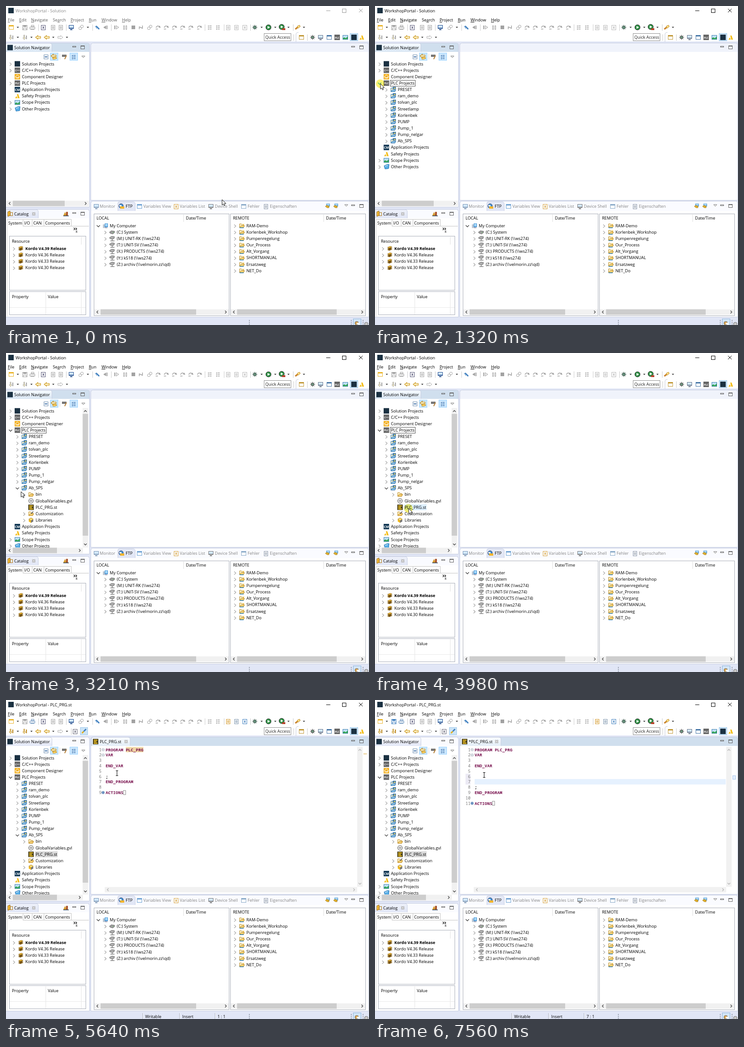
Recreate the animation shown at these times as an HTML page with a canvas. Size 798 by 702 pixels, loop 8000 ms.

```html
<!DOCTYPE html>
<html lang="en">
<head>
<meta charset="utf-8">
<title>Workshop</title>
<style>
html, body { margin: 0; width: 100%; height: 100%; overflow: hidden; background: #fff; }
canvas { display: block; width: 798px; height: 702px; }
</style>
</head>
<body>
<canvas id="stage" width="798" height="702"></canvas>
<script>
const g = document.getElementById('stage').getContext('2d');
const LOOP = 8000, ROW = 14.15, LINE = 11.8;
const SANS = '"Open Sans", "Noto Sans", sans-serif', MONO = '"Noto Sans Mono", "DejaVu Sans Mono", monospace';
const LAV = '#e1e6f6', EDGE = '#c6cde0', PALE = '#f0f3fb', GREY = '#a2a2a2', GOLD = '#eab52c', BLUE = '#3f7fbf', NAVY = '#1b3142', WINE = '#7a1450';

// ---- drawing helpers ----
function rect(x, y, w, h, col) { g.fillStyle = col; g.fillRect(x, y, w, h); }
function frame(x, y, w, h, col) { g.strokeStyle = col; g.lineWidth = 1; g.strokeRect(x + .5, y + .5, w - 1, h - 1); }
function poly(pts, fill, stroke, w = 1, close = true) {
  g.beginPath();
  for (let i = 0; i < pts.length; i += 2) g.lineTo(pts[i], pts[i + 1]);
  if (close) g.closePath();
  if (fill) { g.fillStyle = fill; g.fill(); }
  if (stroke) { g.strokeStyle = stroke; g.lineWidth = w; g.stroke(); }
}
const line = (col, w, ...pts) => poly(pts, null, col, w, false);
function disc(x, y, r, fill, stroke, w = 1) {
  g.beginPath(); g.arc(x, y, r, 0, 7);
  if (fill) { g.fillStyle = fill; g.fill(); }
  if (stroke) { g.strokeStyle = stroke; g.lineWidth = w; g.stroke(); }
}
function text(s, x, y, col = '#000', font = '9.1px ' + SANS, align = 'left') {
  g.font = font; g.fillStyle = col; g.textAlign = align;
  g.fillText(s, x, y + 3.2);
}
function tabShape(x, y, w, h, top, bottom) {
  const grad = g.createLinearGradient(0, y, 0, y + h);
  grad.addColorStop(0, top); grad.addColorStop(1, bottom);
  g.beginPath();
  g.moveTo(x, y + h); g.lineTo(x, y + 3); g.quadraticCurveTo(x, y, x + 3, y);
  g.lineTo(x + w - 5, y); g.quadraticCurveTo(x + w, y, x + w, y + 5); g.lineTo(x + w, y + h);
  g.fillStyle = grad; g.fill();
  g.strokeStyle = EDGE; g.lineWidth = 1; g.stroke();
}
function panel(x, y, w, h, strip, col) {
  g.beginPath(); g.roundRect(x + .5, y + .5, w - 1, h - 1, [5, 5, 0, 0]);
  g.fillStyle = '#fff'; g.fill();
  g.save(); g.clip(); rect(x, y, w, strip, col); g.restore();
  g.beginPath(); g.roundRect(x + .5, y + .5, w - 1, h - 1, [5, 5, 0, 0]);
  g.strokeStyle = EDGE; g.lineWidth = 1; g.stroke();
}
function chevron(x, y, open, hot) {
  const col = hot ? '#35bdeb' : open ? '#333' : '#9a9a9a';
  if (open) line(col, 1.2, x - 3.5, y - 1.8, x, y + 1.8, x + 3.5, y - 1.8);
  else line(col, 1.1, x - 1.8, y - 3.5, x + 1.8, y, x - 1.8, y + 3.5);
}
function arrowTip(x, y, dx, dy, col = '#444') {
  line(col, 1.3, x - 1.5 * dx - 3 * dy, y - 1.5 * dy - 3 * dx, x + 1.5 * dx, y + 1.5 * dy, x - 1.5 * dx + 3 * dy, y - 1.5 * dy + 3 * dx);
}
function hScroll(x0, x1, y, a, b) {
  rect(x0, y - 6, x1 - x0, 12, '#f1f1f1');
  if (b) rect(a, y - 6, b - a, 12, '#cdcdcd');
  const col = b ? '#444' : '#b5b5b5';
  arrowTip(x0 + 7, y, -1, 0, col); arrowTip(x1 - 7, y, 1, 0, col);
}
function vScroll(x, y0, y1, a, b) {
  rect(x - 6, y0, 12, y1 - y0, '#f1f1f1');
  if (b) rect(x - 6, a, 12, b - a, '#cdcdcd');
  const col = b ? '#444' : '#b5b5b5';
  arrowTip(x, y0 + 7, 0, -1, col); arrowTip(x, y1 - 7, 0, 1, col);
}
function minMax(x, y) {
  frame(x - 4, y - 2, 8, 3, '#666');
  frame(x + 14, y - 3, 9, 8, '#666'); rect(x + 14, y - 3, 9, 2, '#666');
}
function cross(x, y) {
  line('#777', 2.6, x - 3, y - 3, x + 3, y + 3); line('#777', 2.6, x + 3, y - 3, x - 3, y + 3);
  line('#fff', 1.1, x - 3, y - 3, x + 3, y + 3); line('#fff', 1.1, x + 3, y - 3, x - 3, y + 3);
}
function tile(x, y, s, col) {
  rect(x - 6, y - 6, 12, 12, col);
  if (s) text(s, x, y - .6, '#fff', 'bold ' + (s.length > 2 ? 5.6 : 7) + 'px ' + SANS, 'center');
}
function folder(x, y, col, edge) {
  poly([x - 5, y + 4, x - 5, y - 4, x - 1, y - 4, x, y - 2, x + 4, y - 2, x + 4, y + 4], '#fff6cf', edge);
  poly([x - 5, y + 4, x - 2, y, x + 6, y, x + 3.5, y + 4], col, edge);
}

// ---- icons, all centred on x, y ----
const icons = {
  brand: (x, y) => tile(x, y, '', NAVY),
  cpp: (x, y) => tile(x, y, 'C++', '#666'),
  plc: (x, y) => tile(x, y, 'PLC', '#666'),
  cm: (x, y) => tile(x, y, 'CM', '#143a56'),
  part: (x, y) => { tile(x, y, '', '#f2ae1d'); poly([x - 5, y, x, y - 4, x + 5, y, x, y + 2], null, '#fff'); text('CMP', x, y + 1.6, '#fff', 'bold 4px ' + SANS, 'center'); },
  safety: (x, y) => { poly([x - 1, y - 4, x + 2, y - 4, x + 5, y + 5, x + 1, y + 5], '#f3bd19'); poly([x - 5, y + 5, x - 2, y, x, y + 5], '#f3bd19'); },
  scope: (x, y) => { rect(x - 6, y - 5, 12, 10, '#bfe0f5'); poly([x - 6, y + 5, x - 6, y + 2, x - 2, y, x + 1, y + 2, x + 6, y - 3, x + 6, y + 5], '#35a853'); frame(x - 6, y - 5, 12, 10, '#4b86b5'); },
  other: (x, y) => { poly([x - 5, y - 2, x + 2, y - 5, x + 6, y - 5, x + 5, y + 4, x - 3, y + 5], '#58aee6', '#2575b8'); line('#fff', 1, x - 3, y - 1, x + 3, y - 3); },
  proj: (x, y) => { folder(x, y + .5, '#8cc4ea', '#2b6ea8'); rect(x - 1, y - 6, 7, 5, '#2f6ea5'); rect(x + 1, y - 4, 4, 2, '#f5d562'); },
  bin: (x, y) => folder(x, y, '#fbd77c', '#b98418'),
  remote: (x, y) => { folder(x, y, '#fbd97a', '#b98b2a'); line('#2f7fb5', 1.6, x - 5, y + 4.5, x + 4, y + 4.5); poly([x + 1, y - 6, x + 3, y - 3, x + 6, y - 4, x + 3, y - 1], '#f2b414'); },
  setup: (x, y) => { folder(x, y, '#fbd77c', '#b98418'); line('#555', 1.6, x, y, x + 5, y - 5); },
  globe: (x, y) => { disc(x, y, 5.3, '#f5f5f5', '#666'); line('#777', .8, x - 5, y, x + 5, y); line('#777', .8, x - 3, y - 4, x + 3, y + 4); line('#777', .8, x + 3, y - 4, x - 3, y + 4); },
  st: (x, y) => { tile(x, y, '', '#4a4220'); [-4, -.7, 2.6].forEach((d, i) => rect(x - 4, y + d, i == 1 ? 6 : 8, 2, '#f6c51e')); },
  lib: (x, y) => { poly([x - 5, y - 2, x, y - 5, x + 5, y - 2, x, y + 1], '#ffe27a', '#a87a12'); poly([x - 5, y - 1, x, y + 1, x, y + 6, x - 5, y + 3], '#f0b81c'); poly([x + 5, y - 1, x, y + 1, x, y + 6, x + 5, y + 3], '#777'); },
  stack: (x, y) => { for (let i = 2; i >= 0; i--) poly([x - 5, y - 2.5 + i * 2.6, x + 1, y - 5 + i * 2.6, x + 5, y - 3.5 + i * 2.6, x - 1, y - 1 + i * 2.6], i ? '#6a4a10' : '#f2bb33', '#8b6314', .8); },
  pc: (x, y) => { rect(x - 5, y - 3, 6, 8, '#b9c6d4'); rect(x - 1, y - 5, 7, 8, '#3d8ed0'); rect(x, y - 4, 5, 5, '#a9dcff'); rect(x, y + 4, 5, 1, '#557'); },
  disk: (x, y) => { poly([x - 6, y, x - 2, y - 3, x + 5, y - 2, x + 5, y + 1, x + 1, y + 4, x - 5, y + 2], '#a0a0a0', '#666'); rect(x + 1, y, 2, 1, '#5c5'); },
  net: (x, y) => { poly([x - 6, y - 2, x - 1, y - 5, x + 5, y - 4, x + 4, y, x, y + 1, x - 5, y], '#b0b0b0', '#666'); line('#777', 1.4, x, y + 1, x, y + 5); line('#777', 1.4, x - 4, y + 5, x + 5, y + 5); },
  win: (x, y, c) => { rect(x - 5, y - 4, 10, 9, '#fff'); frame(x - 5, y - 5, 11, 10, c); rect(x - 5, y - 5, 11, 3, c); },
  save: (x, y, c) => { frame(x - 5, y - 5, 11, 11, c); rect(x - 3, y - 5, 7, 4, c); frame(x - 3, y + 1, 7, 5, c); },
  print: (x, y, c) => { frame(x - 3, y - 5, 7, 4, c); frame(x - 6, y - 1, 12, 5, c); rect(x - 4, y + 3, 8, 2, c); },
  doc: (x, y, c) => { frame(x - 4, y - 5, 9, 11, c); [-2, 0, 2].forEach(d => rect(x - 2, y + d, 5, 1, c)); },
  form: (x, y, c) => { frame(x - 5, y - 5, 10, 11, c); text('x', x, y - .5, c, 'bold 8px ' + SANS, 'center'); },
  list: (x, y, c) => [-4, -.5, 3].forEach(d => { rect(x - 4, y + d, 2, 2, c); rect(x - 1, y + d, 5, 1.3, c); }),
  mon: (x, y, c) => { rect(x - 5, y - 5, 11, 8, c); rect(x - 4, y - 4, 9, 5, '#d4eaff'); rect(x - 2, y + 4, 5, 2, c); },
  link: (x, y, c) => { disc(x - 2, y + 2, 3, null, c); disc(x + 2, y - 2, 3, null, c); },
  pen: (x, y, c) => { line(c, 2.6, x - 3, y - 3, x + 4, y + 4); line(c, 1, x - 5, y - 3, x - 1, y + 3); },
  play: (x, y, c) => { rect(x - 5, y - 4, 2, 8, c); poly([x - 1, y - 4, x + 5, y, x - 1, y + 4], '#eee', c); },
  back: (x, y, c) => { poly([x + 1, y - 4, x - 5, y, x + 1, y + 4], c); rect(x + 2, y - 4, 2, 8, c); },
  pause: (x, y, c) => { frame(x - 4, y - 4, 3, 9, c); frame(x + 1, y - 4, 3, 9, c); },
  stop: (x, y, c) => rect(x - 4, y - 4, 8, 8, c),
  zig: (x, y, c) => line(c, 1.5, x - 4, y + 4, x - 4, y - 1, x + 3, y + 2, x + 3, y - 4),
  step: (x, y, c) => { g.beginPath(); g.arc(x, y + 1, 4, 3.2, 5.9); g.strokeStyle = c; g.lineWidth = 1.6; g.stroke(); poly([x + 1, y, x + 6, y + 1, x + 4, y - 4], c); rect(x - 5, y + 3, 5, 1.4, c); },
  left: (x, y, c) => poly([x - 6, y, x - 1, y - 4, x - 1, y - 2, x + 5, y - 2, x + 5, y + 2, x - 1, y + 2, x - 1, y + 4], '#fff3c4', c, 1.2),
  right: (x, y, c) => poly([x + 6, y, x + 1, y - 4, x + 1, y - 2, x - 5, y - 2, x - 5, y + 2, x + 1, y + 2, x + 1, y + 4], '#fff', c),
  down: (x, y, c) => { poly([x - 1, y + 5, x - 4, y + 1, x - 2, y + 1, x - 2, y - 5, x, y - 5, x, y + 1, x + 2, y + 1], '#fff3c4', c); rect(x + 3, y - 4, 2, 8, c); },
  bug: (x, y, c) => { for (let a = 0; a < 4; a++) { const p = Math.cos(a * .785) * 5.5, q = Math.sin(a * .785) * 5.5; line(c, 1, x - p, y - q, x + p, y + q); } disc(x, y, 3, '#6f9a83', c); },
  run: (x, y, c) => { disc(x, y, 5.8, c, '#333'); poly([x - 2, y - 3, x + 3.5, y, x - 2, y + 3], '#fff'); },
  runTool: (x, y) => { icons.run(x - 1, y - 1, '#2f9145'); rect(x, y + 2, 7, 4, '#b8442c'); },
  torch: (x, y) => { line('#c9822a', 3.4, x - 5, y + 4, x, y); poly([x - 1, y - 2, x + 4, y - 5, x + 6, y - 2, x + 1, y + 2], '#ffe08a', '#b98418'); },
  swap: (x, y) => { icons.left(x - 1, y - 2, '#b98418'); poly([x + 6, y + 3, x + 1, y - 1, x + 1, y + 1, x - 3, y + 1, x - 3, y + 5, x + 1, y + 5], '#ffd867', '#b98418'); },
  hammer: (x, y) => { rect(x - 6, y - 5, 10, 5, '#777'); line('#b5803a', 2, x + 4, y - 3, x, y + 5); },
  collapse: (x, y) => { frame(x - 5, y - 5, 10, 10, '#6f8fb0'); rect(x - 3, y - 1, 6, 2, '#3f70a8'); },
  ftp: (x, y) => { disc(x - 1, y - 1, 5, '#3d8ed0', '#557'); rect(x - 3, y, 9, 5, '#f1b52f'); rect(x - 5, y - 3, 5, 3, '#eee'); },
  plug: (x, y) => { rect(x - 3, y - 5, 8, 6, '#4a9bd8'); rect(x - 2, y - 4, 6, 3, '#b5dcf7'); poly([x - 5, y + 1, x - 1, y - 2, x - 1, y, x + 3, y, x + 3, y + 4, x - 1, y + 4], GOLD, '#9a7416', .8); },
  dd: (x, y) => poly([x - 2.5, y - 1.2, x + 2.5, y - 1.2, x, y + 1.6], '#333'),
  tri: (x, y) => poly([x - 3.5, y - 2, x + 3.5, y - 2, x, y + 1.8], '#fff', '#777'),
  sep: (x, y) => { for (let d = -6; d < 7; d += 2) rect(x, y + d, 1, 1, '#999'); }
};
function put(y, spec, col) {
  for (const item of spec.split(' ')) {
    const [name, x, c] = item.split(':');
    icons[name](+x, y, c || col);
  }
}

// ---- tree rows ----
let mouse = { x: 0, y: 0 };
function row(x, y, chev, icon, label, font) {
  if (chev) {
    const hot = Math.hypot(mouse.x - x + 25, mouse.y - y) < 6;
    chevron(x - 25, y + .8, chev == 'v', hot);
  }
  icons[icon](x - 10, y);
  text(label, x, y, '#000', font);
}
const split = s => s.split('|').map(r => r.split(','));
const HEAD = split('0,>,brand,Solution Projects|0,>,cpp,C/C++ Projects|0,,part,Component Designer');
const KIDS = ['PRESET', 'ram_demo', 'tolvan_plc', 'Streetlamp', 'Korlenbek', 'PUMP', 'Pump_1', 'Pump_nelgar'].map(s => [1, '>', 'proj', s]);
const FILES = split('2,>,bin,bin|2,,globe,GlobalVariables.gvl|2,,st,PLC_PRG.st|2,>,setup,Customization|2,>,lib,Libraries');
const TAIL = split('0,,cm,Application Projects|0,,safety,Safety Projects|0,>,scope,Scope Projects|0,>,other,Other Projects');

function navRows(t) {
  const open = t >= 1320, deep = t >= 2900;
  return [...HEAD, [0, open ? 'v' : '>', 'plc', 'PLC Projects'],
    ...(open ? [...KIDS, [1, deep ? 'v' : '>', 'proj', 'Ab_SPS']] : []),
    ...(deep ? FILES : []), ...TAIL];
}
function rowTint(t, label) {
  if (label == 'Application Projects' && t >= 760 && t < 920) return '#e5f3ff';
  if (label != 'PLC_PRG.st') return null;
  return t >= 4380 ? '#d9d9d9' : t >= 4060 ? '#cce8ff' : t >= 3430 ? '#dcefff' : null;
}

// ---- areas ----
function titleAndMenu(t) {
  const on = t >= 1320, col = on ? '#000' : '#999';
  rect(5, 4, 12, 12, NAVY);
  text('WorkshopPortal - ' + (t >= 4380 ? 'PLC_PRG.st' : 'Solution'), 21, 10.5, on ? '#000' : '#888');
  line(col, 1, 704, 10.5, 713, 10.5);
  frame(739, 6, 9, 9, col);
  line(col, 1, 776, 6, 784, 14); line(col, 1, 784, 6, 776, 14);
  const menu = [['File', 4, 0], ['Edit', 29, 0], ['Navigate', 55, 0], ['Search', 103, 2], ['Project', 142, 0], ['Run', 182, 0], ['Window', 210, 0], ['Help', 255, 0]];
  const ink = on ? '#000' : '#5c5c5c';
  for (const [s, x, k] of menu) {
    text(s, x, 30.5, ink);
    const a = x + g.measureText(s.slice(0, k)).width;
    rect(a, 35, g.measureText(s[k]).width, 1, ink);
  }
}
function toolbars(t) {
  const ed = t >= 4130, dirty = t >= 6770;
  put(47, `win:11:${GOLD} dd:26 save:41:${dirty ? BLUE : GREY} print:58:${ed ? '#6d94bd' : GREY} sep:71 form:82:#557 doc:103 doc:120 sep:132 mon:143:#244f8f link:165 dd:180 sep:190 pen:201:${BLUE} back:219 sep:231`, GREY);
  put(47, 'play:243 pause:262 stop:280 zig:297 link:316 step:334 step:352 step:370 step:388 step:406 step:425 sep:437 list:448 list:466 sep:479', GREY);
  put(47, ed ? 'doc:488:#d59a2c doc:506:#7d95ad form:525:#3f7fbf' : 'doc:488 doc:506 form:525', '#b9b9b9');
  put(47, 'sep:537 bug:547:#26463a dd:562 run:577:#2f9145 dd:592 runTool:607 dd:621 sep:631 torch:641 dd:655', GREY);
  const jump = ed ? '#b98418' : GREY;
  put(69, `down:11:${jump} dd:26 down:41:${jump} dd:56 left:71:#c8941c left:90:#c8941c dd:104 right:119:#aaa dd:134`);
  if (ed) {
    put(69, 'sep:143 form:152:#667');
    rect(163, 60, 17, 17, '#cce4f7'); frame(163, 60, 17, 17, '#9bc7ea');
    line('#e2b01c', 3, 167, 73, 171, 69); line(BLUE, 3, 171, 69, 176, 64);
  }
  rect(567, 60, 60, 17, '#fff'); frame(567, 60, 60, 17, '#8f8f8f');
  text('Quick Access', 570, 68.5, '#222');
  g.strokeStyle = '#c6cbd8'; g.lineWidth = 1;
  g.beginPath(); g.moveTo(637.5, 79); g.lineTo(637.5, 63); g.quadraticCurveTo(637.5, 58, 643, 58); g.stroke();
  put(69, 'sep:632 win:649:#c29a3a sep:662 bug:674:#444 mon:691:#68758a win:710:#4878a8 plc:728 scope:746');
  rect(756, 60, 18, 17, '#cce4f7'); frame(756, 60, 18, 17, '#9bc7ea');
  put(69, 'brand:765 safety:782');
}
function navigator(t) {
  const active = t < 4380, deep = t >= 2900;
  panel(-1, 81, 185, 362, 20, active ? '#d0dfee' : '#fafbff');
  tabShape(-1, 82, 102, 19, active ? '#f7fbff' : '#fff', active ? '#d9e6f3' : LAV);
  icons.brand(9, 91.5);
  text('Solution Navigator', 18, 91.5);
  minMax(150, 90);
  for (const x of [97, 140]) { rect(x, 103, 18, 17, '#cce8ff'); frame(x, 103, 18, 17, '#99d1ff'); }
  put(112, 'collapse:88 swap:106 hammer:129 list:149:#4472a8 tri:170');
  rect(118, 105, 1, 13, '#d5d5d5');
  g.save(); g.beginPath(); g.rect(0, 119, 183, 309); g.clip();
  navRows(t).forEach(([depth, chev, icon, label], i) => {
    const x = 35 + depth * 15, y = 127.3 + i * ROW, tint = rowTint(t, label);
    if (tint) { text(label, x, y); rect(x - 1, y - 6.5, g.measureText(label).width + 2, 13, tint); }
    row(x, y, chev, icon, label);
    if (label == 'PLC Projects' && t >= 1320 && t < 4060) frame(33, 163, 56, 14, '#555');
  });
  g.restore();
  if (deep) {
    vScroll(174.5, 121, 428, 134, 402);
    hScroll(1, 169, 434.5, 15, 112);
  } else hScroll(1, 182, 434.5, 15, 129);
}
function catalog() {
  panel(-1, 447, 185, 238, 20, '#fafbff');
  tabShape(-1, 448, 72, 19, '#eef1fa', LAV);
  poly([4, 453, 9, 451, 9, 461, 4, 463], '#f3bd3a', '#94641a');
  frame(9, 454, 6, 8, '#b57a18');
  text('Catalog', 18, 457.5); cross(61, 457.5);
  poly([126, 461, 130, 453, 133, 461], '#d59a2c'); rect(132, 453, 4, 8, '#a8532c'); rect(126, 461, 12, 1.5, '#345');
  minMax(150, 456);
  rect(2, 484, 180, 1, '#c4c4c4');
  for (const [s, x, w] of [['System', 2, 36], ['I/O', 37, 21], ['CAN', 57, 27], ['Components', 83, 61]]) {
    frame(x, 469, w, 16, '#c4c4c4'); text(s, x + 3, 477.5);
  }
  rect(3, 484, 34, 1, '#fff'); rect(2, 469, 1, 214, '#d5d5d5');
  for (const x of [149, 153]) line('#000', 1.2, x, 488, x + 2.5, 490.5, x, 493);
  text('4', 153, 496, '#000', '7px ' + SANS);
  frame(7, 506, 169, 120, '#a8adb8'); rect(165, 508, 1, 17, '#e0e0e0');
  text('Resource', 13, 517.5);
  ['39', '36', '33', '30'].forEach((v, i) => row(42.5, 533.8 + i * ROW, '>', 'stack', `Kordo V4.${v} Release`, i ? undefined : 'bold 9px ' + SANS));
  frame(7, 628, 169, 52, '#a8adb8');
  rect(87, 630, 1, 49, '#e4e4e4'); rect(165, 630, 1, 49, '#e4e4e4'); rect(8, 663, 167, 1, '#e8e8e8');
  text('Property', 13, 639.5); text('Value', 92, 639.5);
}
function ftpView() {
  panel(186, 429, 612, 256, 22, '#fafbff');
  tabShape(246, 431, 38, 20, '#e6eaf7', LAV);
  put(441, 'mon:198:#7d98b5 ftp:254 win:293:#6fa3d4 form:374:#dba640 mon:450:#777 win:522:#8aaac8 doc:571:#8d98a8');
  const tabs = [['Monitor', 206], ['FTP', 263], ['Variables View', 302], ['Variables List', 382], ['Device Shell', 459], ['Fehler', 531], ['Eigenschaften', 580]];
  for (const [s, x] of tabs) text(s, x, 441, s == 'FTP' ? '#000' : '#858585');
  put(440, 'plug:707 plug:725'); icons.tri(748, 439); minMax(763, 439);
  for (const [x, w, col, s] of [[193, 298, 390, 'LOCAL'], [493, 298, 698, 'REMOTE']]) {
    frame(x, 457, w, 225, '#a8adb8');
    text(s, x + 6, 467); text('Date/Time', col + 5.5, 467);
    rect(col, 459, 1, 16, '#ddd');
  }
  row(228, 483.5, 'v', 'pc', 'My Computer');
  ['(C:) System', '(M:) UNIT-RK (\\\\ws274)', '(T:) UNIT-SV (\\\\ws274)', '(X:) PRODUCTS (\\\\ws274)', '(Y:) k518 (\\\\ws274)', '(Z:) archiv (\\\\velmorin.zz\\qd)']
    .forEach((s, i) => row(243.5, 497.7 + i * ROW, '>', i ? 'net' : 'disk', s));
  ['RAM-Demo', 'Korlenbek_Workshop', 'Pumpenregelung', 'Our_Process', 'Alt_Vorgang', 'SHORTMANUAL', 'Ersatzweg', 'NET_Do']
    .forEach((s, i) => row(528.5, 483.5 + i * ROW, '>', 'remote', s));
  hScroll(194, 490, 673.5, 208, 418);
  hScroll(494, 790, 673.5, 508, 727);
}
function editor(t) {
  const open = t >= 4380;
  panel(186, 81, 612, 347, 20, open ? '#d0dfee' : PALE);
  minMax(763, 90);
  if (!open) return;
  const extra = t >= 6940 ? 2 : t >= 6770 ? 1 : 0, name = (extra ? '*' : '') + 'PLC_PRG.st';
  tabShape(188, 82, extra ? 89 : 85, 19, '#fbfdff', '#e2edf7');
  icons.st(197, 91.5); text(name, 206, 91.5); cross(extra ? 267.5 : 264, 91.5);
  vScroll(778, 103, 411); hScroll(217, 772, 417.5);
  if (t < 4450) return;

  const cur = t < 5800 ? 0 : 5 + extra, yOf = n => 109.3 + (n - 1) * LINE;
  if (cur) rect(219, yOf(cur) - 6.2, 552, 12, '#e6f1fe');
  const occ = t >= 4930 && t < 7010;
  if (occ) { rect(263.5, 103.5, 38.5, 11.5, '#f1d7a6'); rect(786, 117, 7, 3, '#fbeed2'); frame(786, 117, 7, 3, '#ecd29c'); }
  if (extra) {
    const h = extra * 5 - 1;
    rect(786, 166, 7, h, '#e3efff'); frame(786, 166, 7, h, '#a9c6ea');
  }
  const code = ['PROGRAM PLC_PRG', 'VAR', '', 'END_VAR', '', ...Array(extra).fill(''), ';', 'END_PROGRAM', '', 'ACTIONS'];
  code.forEach((s, i) => {
    const y = yOf(i + 1);
    if (extra && i > 4 && i < 5 + extra) rect(199, y - 6, 11, 12, '#eceaf4');
    text(i + 1, 210, y, '#787878', '9.2px ' + MONO, 'right');
    text(s, 219, y, s == ';' ? '#000' : WINE, 'bold 9.22px ' + MONO);
    if (i < 2 || s == 'ACTIONS') {
      const more = i > 1, col = more ? '#2b5f9e' : '#9aa7b5';
      disc(213.5, y, 2.8, more ? '#cfe2f7' : '#fff', col, .9);
      rect(211.5, y - .5, 4, 1, col);
      if (more) { rect(213, y - 2, 1, 4, col); frame(257.5, y - 5, 6, 10, '#888'); }
    }
  });
  if ((t >= 5880 && t < 6370) || (t >= 6770 && t < 7480)) rect(219, yOf(cur) - 6, 1.6, 11.5, '#000');
}
function status(t) {
  if (t >= 4130) {
    for (const x of [300, 381, 459]) { rect(x, 689, 1, 13, '#a9afbf'); rect(x + 1, 689, 1, 13, '#fff'); }
    if (t >= 4380) {
      text('Writable', 306, 696.5); text('Insert', 387.5, 696.5);
      text((t >= 6940 ? 7 : t >= 6770 ? 6 : t >= 5800 ? 5 : 1) + ' : 1', 465, 696.5);
    }
  }
  for (const x of [534, 758]) for (let y = 691; y < 702; y += 4) rect(x, y, 2, 2, '#9299a8');
  rect(763, 688, 18, 14, '#d4e6f7'); frame(763, 688, 18, 16, '#8eb4dc');
  disc(771, 698, 4, '#d8a24a', '#777'); rect(771, 697, 6, 4, '#fff');
  for (let y = 691; y < 702; y += 4) rect(784, y, 2, 2, '#9299a8');
  disc(792, 700, 4, '#c8c8c8', '#777');
}

// ---- pointer ----
// start, end, number of jumps, target
const MOVES = [[80, 850, 11, 18, 180], [920, 1000, 2, 12, 171], [1700, 2480, 11, 23, 293], [2560, 2560, 1, 23, 296],
  [3110, 3580, 7, 74, 342], [4780, 5560, 11, 247, 158], [5640, 5640, 1, 244, 161], [6030, 6120, 2, 240, 165]];
const CLICKS = [[1320, 1430], [2900, 2960], [3980, 4060], [5800, 5880]];

function pointerAt(t) {
  let x = 475, y = 426;
  for (const [a, b, n, tx, ty] of MOVES) {
    if (t < a) break;
    const k = t >= b ? 1 : (Math.floor((t - a) / (b - a) * (n - 1)) + 1) / n;
    const e = k * k * (3 - 2 * k);
    x += (tx - x) * e; y += (ty - y) * e;
  }
  return { x, y };
}
function pointer(t) {
  const { x, y } = mouse;
  if (CLICKS.some(([a, b]) => t >= a && t < b)) {
    g.globalCompositeOperation = 'multiply';
    disc(x - .5, y, 9.5, 'rgba(250,235,40,.65)');
    g.globalCompositeOperation = 'source-over';
  }
  if (t >= 6940 && t < 7560) return;
  if (t >= 4780 && x > 190) {
    line('#111', 1.1, x, y - 5.5, x, y + 5.5);
    for (const d of [-5.5, 5.5]) line('#111', 1.1, x - 2.5, y + d, x + 2.5, y + d);
  } else {
    const shape = [0, 0, 0, 12, 2.8, 9.6, 4.7, 13.7, 6.6, 12.8, 4.8, 8.9, 8.5, 8.7];
    poly(shape.map((v, i) => v + (i % 2 ? y : x)), '#fff', '#111');
  }
}

function draw(t) {
  mouse = pointerAt(t);
  rect(0, 0, 798, 702, LAV);
  rect(0, 0, 798, 78, '#fff');
  titleAndMenu(t); toolbars(t);
  navigator(t); catalog(); editor(t); ftpView(); status(t);
  pointer(t);
}
const start = performance.now();
function tick() {
  draw((performance.now() - start) % LOOP);
  requestAnimationFrame(tick);
}
tick();
</script>
</body>
</html>
```
